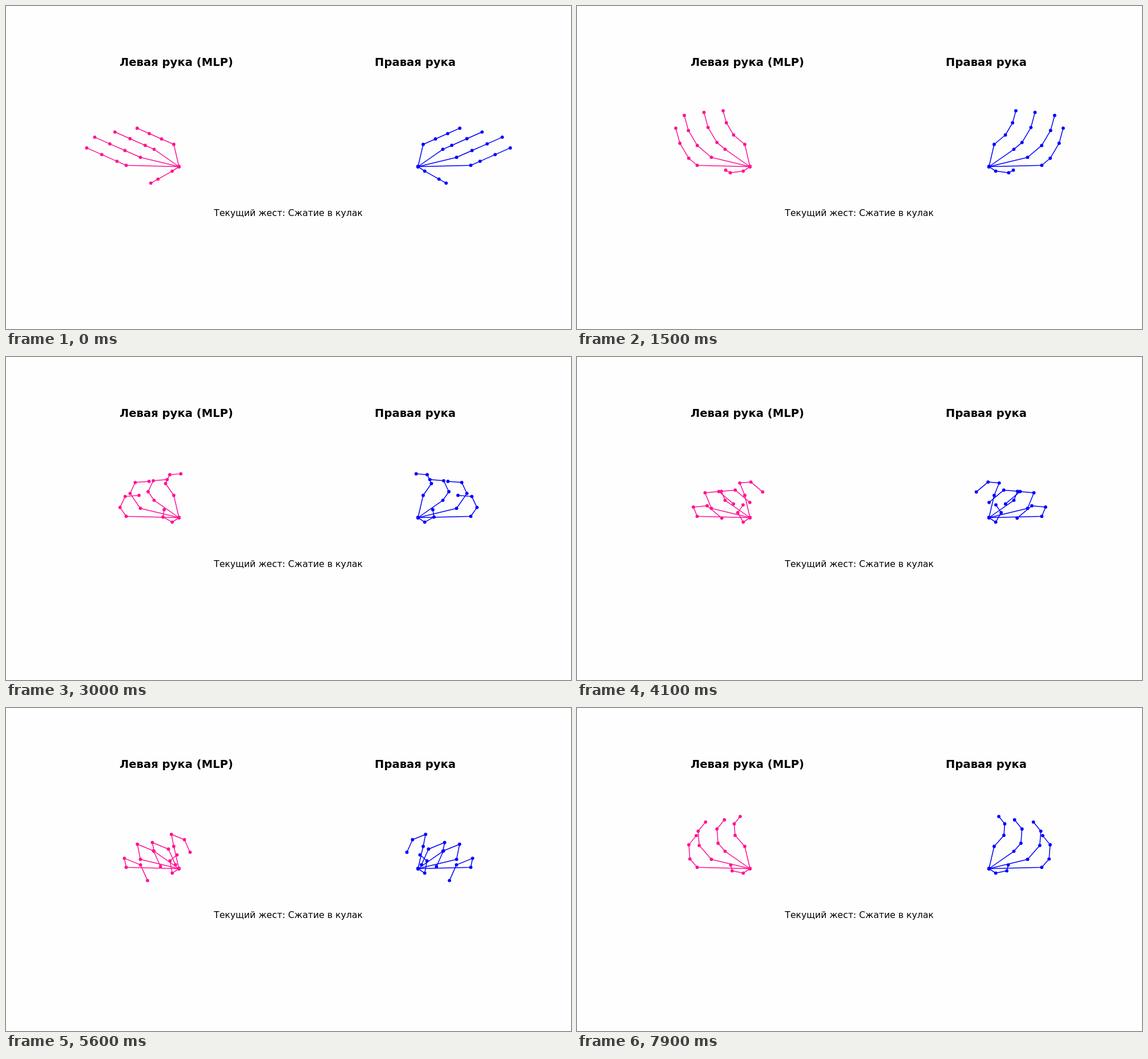
Animation, 990 px wide and 566 px high, one loop 8000 ms. Source, as an HTML page with a canvas:

```html
<!DOCTYPE html>
<html lang="ru">
<head>
<meta charset="utf-8">
<style>
  html, body { margin: 0; width: 990px; height: 566px; overflow: hidden; background: #fefefe; }
  canvas { display: block; }
</style>
</head>
<body>
<canvas id="stage" width="990" height="566"></canvas>
<script>
const ctx = document.getElementById('stage').getContext('2d');
const LOOP = 8, STEP = 0.1;
const WRIST = [302.8, 281.2];
const RISE = -23.5; // screen height of a unit segment pointing straight up

const long = { dir: [-26.5, -11.7], bend: [0.8, 1, 0.667], depth: 0.033 };
const thumb = { dir: [-25, 14], bend: [0.82, 0.82], depth: 0.015 };
const fingers = [
  { ...thumb, base: [291, 289], lengths: [1, 0.5] },
  { ...long, base: [293.7, 242.2], lengths: [0.81, 0.81, 0.8] },
  { ...long, base: [259.2, 250.8], lengths: [0.59, 1, 1] },
  { ...long, base: [235.2, 264.9], lengths: [1.02, 1, 1] },
  { ...long, base: [210.3, 278.9], lengths: [0.61, 1, 1] }
];

// Degrees of the middle joint: closes steadily, then opens.
const curlAt = t => Math.min(20.2 * t, 222.8 - 22.15 * t);

function joints({ dir, bend, depth, base, lengths }, curl) {
  const points = [WRIST, base];
  let [x, y] = base, angle = 0;
  lengths.forEach((length, i) => {
    angle += bend[i] * curl * Math.PI / 180;
    const c = Math.cos(angle), s = Math.sin(angle);
    const scale = length * (1 + depth * (1 - c)); // nearer parts look larger
    x += dir[0] * c * scale;
    y += (dir[1] * c + RISE * s) * scale;
    points.push([x, y]);
  });
  return points;
}

function drawHand(color, curl, mirrored) {
  ctx.save();
  if (mirrored) {
    ctx.translate(1024.7, 0.3);
    ctx.scale(-1, 1);
  } else {
    ctx.translate(0.3, 0.3);
  }
  ctx.strokeStyle = ctx.fillStyle = color;
  ctx.lineWidth = 1.5;
  ctx.lineJoin = 'round';
  for (const finger of fingers) {
    const points = joints(finger, curl);
    ctx.beginPath();
    points.forEach(p => ctx.lineTo(...p));
    ctx.stroke();
    for (const p of points) {
      ctx.beginPath();
      ctx.arc(...p, 2.9, 0, 2 * Math.PI);
      ctx.fill();
    }
  }
  ctx.restore();
}

function label(text, x, y, font) {
  ctx.font = font + ' "DejaVu Sans", sans-serif';
  ctx.textAlign = 'center';
  ctx.fillStyle = '#000';
  ctx.fillText(text, x, y);
}

function draw(now) {
  const t = Math.floor(now / 1000 % LOOP / STEP + 1e-6) * STEP;
  const curl = curlAt(t);
  ctx.fillStyle = '#fefefe';
  ctx.fillRect(0, 0, 990, 566);
  label('Левая рука (MLP)', 298.5, 105, 'bold 19.6px');
  label('Правая рука', 717, 105, 'bold 19.6px');
  label('Текущий жест: Сжатие в кулак', 494.7, 368, '15.7px');
  drawHand('#ff1493', curl, false);
  drawHand('#0000ff', curl, true);
}

const start = performance.now();
function tick() {
  draw(performance.now() - start);
  requestAnimationFrame(tick);
}
tick();
</script>
</body>
</html>
```
